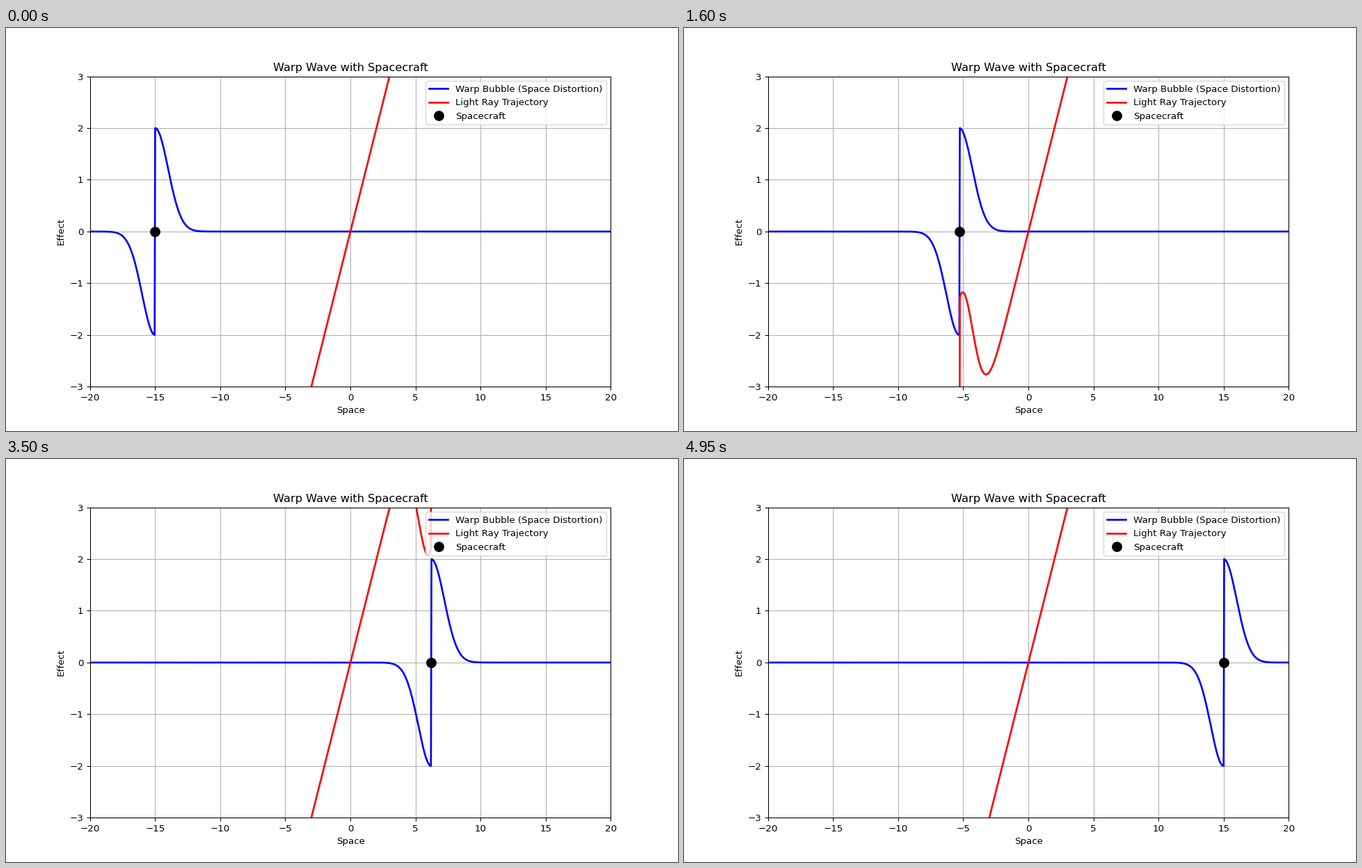
Write a matplotlib script that moves like this. It is 966x580 px and loops after 5 s.

```python
import matplotlib.pyplot as plt
import numpy as np
from matplotlib.animation import FuncAnimation

WIDTH, HEIGHT, DPI = 966, 580, 96.6
FRAMES, INTERVAL = 100, 50
START, END = -15, 15

plt.rcParams["font.family"] = "DejaVu Sans"

x = np.linspace(-20, 20, 1000)
path = np.linspace(START, END, FRAMES)


def warp(center):
    """Gaussian bubble: contraction behind the craft, expansion ahead."""
    d = x - center
    return 2 * np.sign(d) * np.exp(-d**2 / 2)


# The tiny margin keeps the pixel size from being rounded down.
fig, ax = plt.subplots(
    figsize=((WIDTH + 1e-3) / DPI, (HEIGHT + 1e-3) / DPI), dpi=DPI
)
bubble, = ax.plot([], [], "b-", lw=2, label="Warp Bubble (Space Distortion)")
light, = ax.plot([], [], "r-", lw=2, label="Light Ray Trajectory")
craft, = ax.plot([], [], "ko", markersize=10, label="Spacecraft")

ax.set_xlim(-20, 20)
ax.set_ylim(-3, 3)
ax.set_xlabel("Space")
ax.set_ylabel("Effect")
ax.set_title("Warp Wave with Spacecraft")
ax.grid(True)
ax.legend(loc="upper right")


def update(frame):
    center = path[frame]
    shift = warp(center)
    bubble.set_data(x, shift)
    light.set_data(x, x + 2 * shift)
    craft.set_data([center], [0])
    return bubble, light, craft


def init():
    return update(0)


anim = FuncAnimation(
    fig, update, frames=FRAMES, init_func=init,
    interval=INTERVAL, repeat=True, repeat_delay=0, blit=False,
)

plt.show()
```
